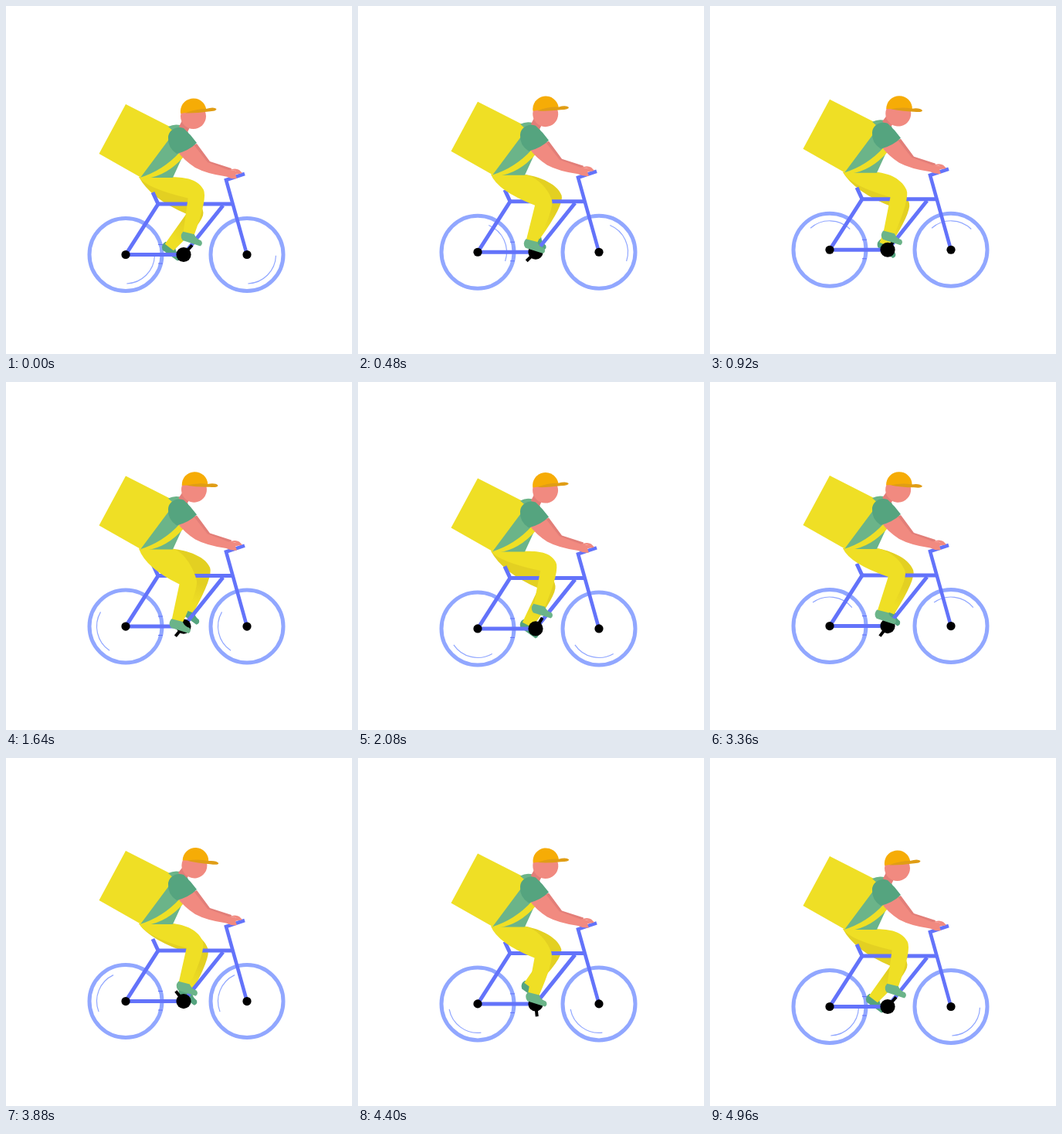
These frames come from a looping animation (448 by 450 pixels, 5000 ms). An HTML page with a canvas:

```html
<!DOCTYPE html>
<html lang="en">
<head>
<meta charset="utf-8">
<title>Courier on a bike</title>
<style>
html, body { margin: 0; width: 100%; height: 100%; overflow: hidden; background: #fff; }
canvas { display: block; }
</style>
</head>
<body>
<canvas id="stage" width="448" height="450"></canvas>
<script>
const ctx = document.getElementById('stage').getContext('2d');
const LOOP = 5000, STEP = 40, RIDE = 4960, BOB = 2480, BOB_PEAK = 1210;
const RAD = Math.PI / 180;
const C = {
  yellow: '#efdf25', shade: '#e3d022', frame: '#6373fa', tyre: '#91a7ff',
  shirt: '#6bb489', sleeve: '#55a47f', skin: '#f18a80', skinDark: '#e27e78',
  cap: '#f6ac06', brim: '#e09d15', black: '#000'
};

// time, near foot angle and radius, far foot angle and radius, crank angle
const PEDALS = [
  [0, -49, 10.6, 167, 13, -48],
  [920, 304, 3.6, 430, 6, 304],
  [1640, 484, 14.5, 688, 14, 490],
  [2080, 656, 11.5, 843, 9, 662],
  [2840, 1142, 8.5, 1373, 10, 1103],
  [3880, 1364, 4, 1440, 9, 1312],
  [4960, 1751, 10.6, 1967, 13, 1752]
];

function pedalsAt(t) {
  const i = Math.max(1, PEDALS.findIndex(k => k[0] > t));
  const a = PEDALS[i - 1], b = PEDALS[i];
  const u = (t - a[0]) / (b[0] - a[0]);
  return a.map((v, j) => v + (b[j] - v) * u);
}

const polar = (x, y, r, deg) => [x + r * Math.cos(deg * RAD), y + r * Math.sin(deg * RAD)];

function disc(x, y, r, color) {
  ctx.fillStyle = color;
  ctx.beginPath();
  ctx.arc(x, y, r, 0, 7);
  ctx.fill();
}

function line(points, color, width) {
  ctx.strokeStyle = color;
  ctx.lineWidth = width;
  ctx.beginPath();
  points.forEach(p => ctx.lineTo(...p));
  ctx.stroke();
}

function shape(d, color) {
  ctx.fillStyle = color;
  ctx.fill(new Path2D(d));
}

function kneeOf(hip, ankle, thigh, shin) {
  const dx = ankle[0] - hip[0], dy = ankle[1] - hip[1];
  const d = Math.min(Math.hypot(dx, dy), thigh + shin);
  const bend = Math.acos((thigh * thigh + d * d - shin * shin) / (2 * thigh * d));
  return polar(...hip, thigh, (Math.atan2(dy, dx) - bend) / RAD);
}

// Trouser leg with a rounded knee: front edge down to the ankle, back edge up to the seat.
function leg(hip, knee, ankle, width, color) {
  const out = Math.atan2(2 * knee[1] - hip[1] - ankle[1], 2 * knee[0] - hip[0] - ankle[0]) / RAD;
  const cap = polar(...knee, width, out);
  const inner = polar(...knee, -width, out);
  const shin = Math.atan2(ankle[1] - knee[1], ankle[0] - knee[0]) / RAD;
  const front = polar(...ankle, 7, shin - 90);
  const back = polar(...ankle, 7, shin + 90);
  ctx.fillStyle = color;
  ctx.beginPath();
  ctx.moveTo(172, 221);
  ctx.lineTo(214, 221);
  ctx.bezierCurveTo(228, 222, ...polar(...cap, -18, out + 90), ...cap);
  ctx.quadraticCurveTo(...polar(...cap, 12, out + 90), ...front);
  ctx.lineTo(...back);
  ctx.lineTo(...inner);
  ctx.quadraticCurveTo(hip[0] - 6, hip[1] + (knee[1] - hip[1]) / 2, 172, 221);
  ctx.fill();
}

function shoe([x, y], tilt, color) {
  ctx.save();
  ctx.translate(x, y);
  ctx.rotate(tilt * RAD);
  shape('M-8 -3 L7 -4 Q11 1 18 1 Q22 4 19 8 L-5 8 Q-11 4 -8 -3Z', color);
  ctx.restore();
}

function wheel(x, y, angle) {
  ctx.strokeStyle = C.tyre;
  ctx.lineWidth = 5;
  ctx.beginPath();
  ctx.arc(x, y, 47, 0, 7);
  ctx.stroke();
  ctx.lineWidth = 1.2;
  ctx.beginPath();
  ctx.arc(x, y, 37.5, (angle - 43) * RAD, (angle + 43) * RAD);
  ctx.stroke();
}

function farLeg(ankle) {
  const hip = [193, 230], knee = kneeOf(hip, ankle, 64, 55);
  const fade = ctx.createLinearGradient(...knee, ...ankle);
  fade.addColorStop(0.3, C.shade);
  fade.addColorStop(0.8, C.yellow);
  shoe(ankle, 36, C.sleeve);
  leg(hip, knee, ankle, 11, fade);
}

function nearLeg(ankle) {
  const hip = [187, 228], knee = kneeOf(hip, ankle, 60.5, 55);
  leg(hip, knee, ankle, 11.5, C.yellow);
  shoe(ankle, 18, C.shirt);
}

function bike(crank) {
  line([[190, 241], [197, 256], [155, 321.5], [230, 321.5], [281, 258]], C.frame, 5);
  line([[195, 256], [295, 256]], C.frame, 5);
  line([[312, 321.5], [285, 225], [309, 217]], C.frame, 4.6);
  line([[197, 308.5], [203, 308.5]], C.frame, 1);
  line([[197, 333], [203, 333]], C.frame, 1);
  line([[230, 321.5], polar(230, 321.5, 16.5, crank)], C.black, 4);
  disc(155, 321.5, 5.6, C.black);
  disc(312, 321.5, 5.6, C.black);
  disc(230, 321.5, 9.6, C.black);
}

function torso() {
  shape('M210 156 Q222 150 234 158 L240 178 L228 196 L216 222 H174 L218 163Z', C.shirt);
  shape('M225 189 L230 195 Q209 219 182 223 L173 222 Q203 213 225 189Z', C.yellow);
}

function arm() {
  shape('M240 181 L247 178 L264 201 L292 210 L291 215 L262 208Z', C.skinDark);
  shape('M222 188 L242 178 L261 202 L288 212 Q296 212 305 216 L297 218 L299 223 Q292 224 285 220.5 Q260 217 245 209 Q231 200 222 188Z', C.skin);
  shape('M289 212 Q297 209 302 212 L306 216 L302 217 L297 213Z', C.skin);
  shape('M214 161 Q221 155 230 158 Q239 166 247 177 Q237 187 221 191 Q209 183 210 170 Q210 165 214 161Z', C.sleeve);
}

function head(nod) {
  ctx.save();
  ctx.translate(227, 151);
  ctx.rotate(nod * RAD);
  ctx.translate(-227, -151);
  shape('M228 148 L238 157 L234 165 L224 156Z', C.skinDark);
  disc(242.5, 142.5, 16.5, C.skin);
  ctx.fillStyle = C.cap;
  ctx.beginPath();
  ctx.arc(242.7, 136.2, 16.8, 170 * RAD, -8 * RAD);
  ctx.fill();
  shape('M232 138.5 Q245 133 259 133 Q269 130 272.5 133 Q273 136 262 136.5 Q246 139 232 138.5Z', C.brim);
  ctx.restore();
}

function draw(t) {
  const phase = t % BOB;
  const rise = phase < BOB_PEAK ? phase / BOB_PEAK : (BOB - phase) / (BOB - BOB_PEAK);
  const ease = (1 - Math.cos(Math.PI * rise)) / 2;
  const [, nearAngle, nearR, farAngle, farR, crank] = pedalsAt(t);
  const spin = 45 - 360 * t / BOB;

  ctx.fillStyle = '#fff';
  ctx.fillRect(0, 0, 448, 450);
  ctx.save();
  ctx.translate(0, -8.2 * rise);
  wheel(155, 321.5, spin);
  wheel(312, 321.5, spin);
  farLeg(polar(224, 309, farR, farAngle));
  bike(crank);
  shape('M155 127 L220 160 L184 227 L120.5 191Z', C.yellow);
  nearLeg(polar(229, 305, nearR, nearAngle));
  torso();
  head(13.5 * ease * ease);
  arm();
  ctx.restore();
}

function tick(now) {
  const t = Math.floor((now % LOOP) / STEP) * STEP;
  draw(t % RIDE);
  requestAnimationFrame(tick);
}
draw(0);
requestAnimationFrame(tick);
</script>
</body>
</html>
```
